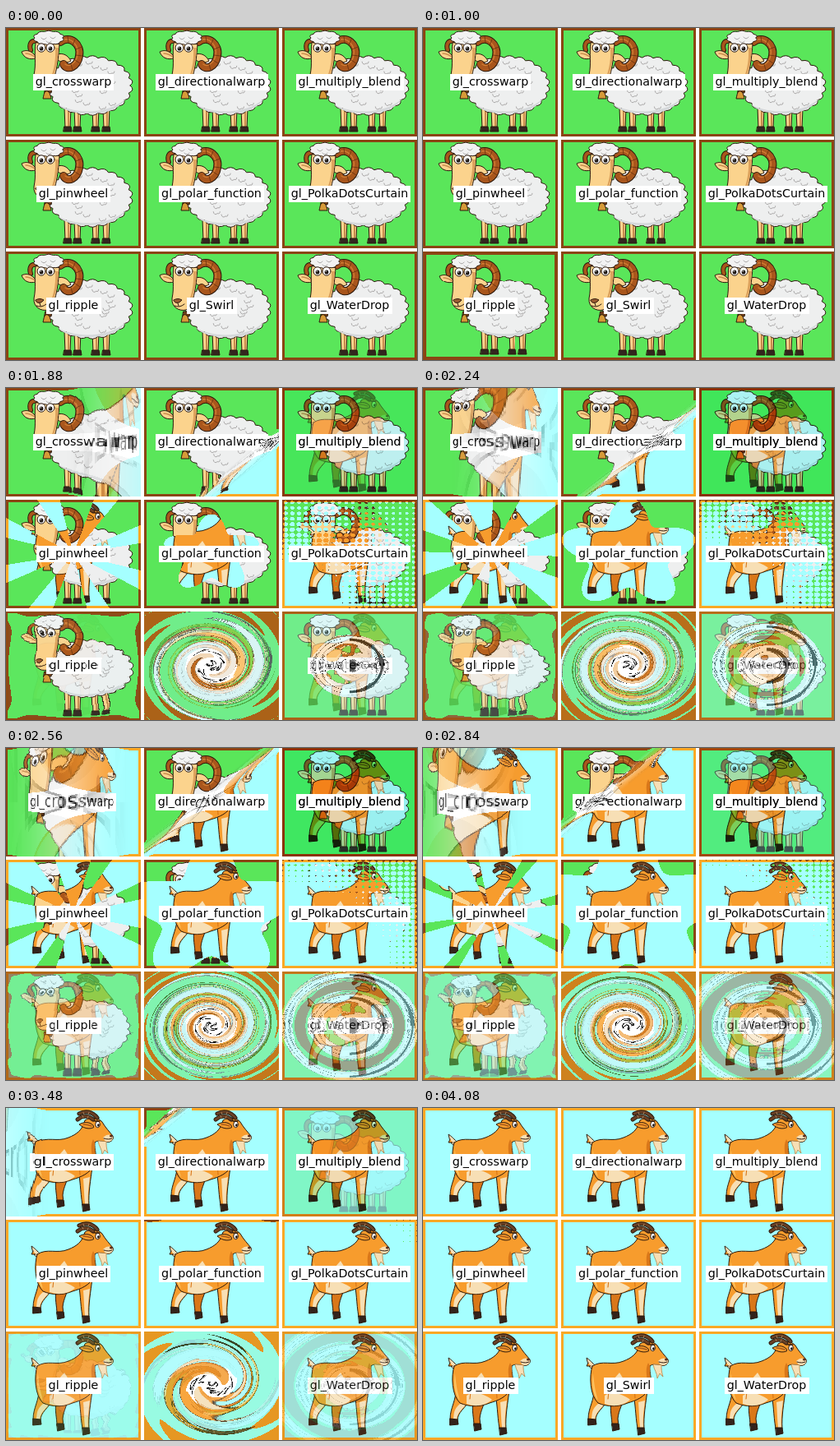
An HTML page with a canvas for the animation above (5 s loop, 500 by 404 pixels).

```html
<!DOCTYPE html>
<html>
<head>
<meta charset="utf-8">
<title>Transition gallery</title>
<style>
html, body { margin: 0; width: 100%; height: 100%; overflow: hidden; background: #fff; }
canvas { display: block; }
</style>
</head>
<body>
<canvas id="stage" width="500" height="404"></canvas>
<script>
const W = 164, H = 132, GAP = 4;
const START = 1000, SPAN = 3000, LOOP = 5000, STEP = 40;
const { PI, sin, cos, floor, atan2, hypot } = Math;

const clamp = (v, lo, hi) => v < lo ? lo : v > hi ? hi : v;
const smooth = (a, b, v) => { const t = clamp((v - a) / (b - a), 0, 1); return t * t * (3 - 2 * t); };
const scale = (v, k) => (v - 0.5) * k + 0.5;

// Each effect maps a point (y up, 0..1) and progress to a mix amount m
// and the sampling points in the first (fx, fy) and second (tx, ty) picture.
const effects = {
  gl_crosswarp(x, y, p) {
    const m = smooth(0, 1, p * 2 + x - 1);
    return { m, fx: scale(x, 1 - m), fy: scale(y, 1 - m), tx: scale(x, m), ty: scale(y, m) };
  },
  gl_directionalwarp(x, y, p) {
    const soft = 0.1;
    const m = 1 - smooth(-soft, 0, (y - x) / 2 + 0.5 - p * (1 + soft));
    return { m, fx: scale(x, 1 - m), fy: scale(y, 1 - m), tx: scale(x, m), ty: scale(y, m) };
  },
  gl_multiply_blend(x, y, p) {
    return { m: p, multiply: true };
  },
  gl_pinwheel(x, y, p) {
    const slice = PI / 4, a = atan2(y - 0.5, x - 0.5) + p * 2;
    return { m: a - slice * floor(a / slice) < p ? 1 : 0 };
  },
  gl_polar_function(x, y, p) {
    const a = atan2(y - 0.5, x - 0.5) - PI / 2;
    const radius = (cos(5 * a) + 4) / 4;
    return { m: hypot(x - 0.5, y - 0.5) > radius * p ? 0 : 1 };
  },
  gl_PolkaDotsCurtain(x, y, p) {
    const d = hypot(x * 20 % 1 - 0.5, y * 20 % 1 - 0.5);
    return { m: d < p / hypot(x, y) ? 1 : 0 };
  },
  gl_ripple(x, y, p) {
    const dx = x - 0.5, dy = y - 0.5;
    const k = (sin(p * hypot(dx, dy) * 100 - p * 50) + 0.5) / 30;
    return { m: smooth(0.2, 1, p), fx: x + dx * k, fy: y + dy * k };
  },
  gl_Swirl(x, y, p) {
    const dx = x - 0.5, dy = y - 0.5, near = 1 - hypot(dx, dy);
    const a = near * near * (1 - Math.abs(2 * p - 1)) * 8 * PI;
    const s = sin(a), c = cos(a);
    const fx = dx * c - dy * s + 0.5, fy = dx * s + dy * c + 0.5;
    return { m: p, fx, fy, tx: fx, ty: fy };
  },
  gl_WaterDrop(x, y, p) {
    const dx = x - 0.5, dy = y - 0.5, d = hypot(dx, dy);
    const k = d > p ? 0 : sin(d * 30 - p * 30);
    return { m: p, fx: x + dx * k, fy: y + dy * k };
  }
};

// ---- pictures ----

const INK = '#2b180c';

function shape(g, d, fill, line = INK, width = 1) {
  const path = new Path2D(d);
  if (fill) { g.fillStyle = fill; g.fill(path); }
  if (line) { g.strokeStyle = line; g.lineWidth = width; g.stroke(path); }
}

function oval(g, x, y, rx, ry, fill, line = INK, width = 1) {
  g.beginPath();
  g.ellipse(x, y, rx, ry, 0, 0, 2 * PI);
  if (fill) { g.fillStyle = fill; g.fill(); }
  if (line) { g.strokeStyle = line; g.lineWidth = width; g.stroke(); }
}

function tube(g, d, fill, width) {
  shape(g, d, null, INK, width + 2);
  shape(g, d, null, fill, width);
}

function cloud(g, x, y, rx, ry, n, puff, fill) {
  const at = (i, k) => [x + cos(i * 2 * PI / n) * rx * k, y + sin(i * 2 * PI / n) * ry * k];
  g.beginPath();
  g.moveTo(...at(0, 1));
  for (let i = 0; i < n; i++) g.quadraticCurveTo(...at(i + 0.5, puff), ...at(i + 1, 1));
  g.fillStyle = fill;
  g.fill();
  g.strokeStyle = INK;
  g.lineWidth = 1;
  g.stroke();
}

function backdrop(g, fill, edge) {
  g.fillStyle = edge;
  g.fillRect(0, 0, W, H);
  g.fillStyle = fill;
  g.fillRect(3, 3, W - 6, H - 6);
  g.lineJoin = g.lineCap = 'round';
}

function sheep(g) {
  const skin = '#fbd38d', horn = '#a9561c';
  backdrop(g, '#5ae65a', '#8b4513');
  for (const [x, y] of [[83, 97], [118, 98], [71, 97], [105, 98]]) {
    shape(g, `M${x} ${y}L${x + 1} 122L${x + 7} 122L${x + 8} ${y}Z`, skin);
    shape(g, `M${x + 5} ${y}L${x + 5} 119`, null, '#c98d4e', 2);
    shape(g, `M${x} 120L${x + 8} 120L${x + 9} 126L${x - 1} 126Z`, '#33261f');
  }
  cloud(g, 102, 70, 49, 34, 23, 1.15, '#eeefef');
  shape(g, 'M62 92C80 104 122 107 146 86C134 103 116 104 98 104C82 104 69 100 62 92Z', '#d5d8da', null);
  // curls of wool
  for (let i = 0; i < 19; i++) {
    const a = i * 2.4, r = 0.35 + i % 4 * 0.16;
    const x = 106 + cos(a) * 46 * r, y = 70 + sin(a) * 34 * r;
    shape(g, `M${x - 4} ${y - 1}q1 5 5 2q3 1 3 -2`, null, '#8b8988', 0.7);
  }
  shape(g, 'M48 73L56 73L55 79L47 79Z', '#70401c');
  shape(g, 'M48 77C53 75 54 82 55 86L45 86C46 82 46 79 48 77Z', '#d69a37');
  tube(g, 'M37 16C30 15 28 20 30 27', horn, 4);
  shape(g, 'M35 33C29 26 23 27 19 29C22 37 29 39 36 37Z', skin);
  shape(g, 'M24 31C28 31 32 33 35 35', null, '#c98d4e', 1.5);
  shape(g, 'M62 32C70 30 75 33 79 40C73 44 66 42 62 38Z', skin);
  tube(g, 'M66 17C78 8 92 20 89 34C87 47 75 53 70 44', horn, 8);
  shape(g, 'M68 15C80 10 89 22 87 33C85 43 77 48 72 44', null, '#cf7c33', 1.5);
  for (const d of ['M75 10L76 18', 'M84 14L81 21', 'M92 23L85 26', 'M93 34L85 33', 'M90 43L84 39', 'M81 51L79 44'])
    shape(g, d, null, '#64300f', 0.8);
  shape(g, 'M36 18C34 32 37 43 34 57C33 68 43 73 51 71C60 66 63 46 65 20Z', skin);
  shape(g, 'M60 24C61 42 57 57 51 68C59 63 63 42 64 24Z', '#dca15c', null);
  cloud(g, 52, 12, 17, 8, 10, 1.28, '#f2f2f2');
  for (const [x, y] of [[47, 12], [58, 11], [53, 16]])
    shape(g, `M${x - 4} ${y}q3 4 6 0`, null, '#8b8988', 0.7);
  for (const x of [43, 54]) {
    oval(g, x, 24, 5, 5.2, '#fff');
    oval(g, x, 25, 2.4, 2.6, '#1e1713', null);
    oval(g, x - 0.8, 24, 0.7, 0.7, '#fff', null);
  }
  shape(g, 'M36 59Q41 56 46 59Q42 64 38 62Z', '#9b5b32');
  shape(g, 'M41 63L42 66M37 66Q43 69 49 64', null);
}

function goat(g) {
  const coat = '#f79c2d', shade = '#d97719', cream = '#f7dfb5', horn = '#694126';
  backdrop(g, '#a5ffff', '#f9a825');
  shape(g, 'M38 46C33 43 32 37 31 32C34 34 36 36 41 41Z', cream);
  shape(g, 'M36 42L31 42L33 38', coat);
  // far legs
  shape(g, 'M77 76C75 90 70 95 69 106L70 115L62 115C62 105 59 96 61 86Z', shade);
  shape(g, 'M62 112L70 112L71 119L63 121Z', '#33231b');
  shape(g, 'M40 68C41 84 33 92 33 107L42 108C42 98 51 94 58 82Z', coat);
  shape(g, 'M45 88C37 95 38 99 37 106L41 107C42 98 48 95 52 89Z', cream, null);
  shape(g, 'M33 106L42 107L43 113L33 114Z', '#33231b');
  shape(g, 'M87 73C91 88 90 100 93 118L101 118C100 103 103 88 105 71Z', coat);
  shape(g, 'M94 86C95 98 95 108 96 117L100 117C99 104 101 94 102 84Z', cream, null);
  shape(g, 'M93 117L101 117L102 124L94 126Z', '#33231b');
  shape(g, 'M38 42C50 34 62 42 76 36C86 32 93 27 96 15C102 11 112 11 117 17' +
    'C121 24 126 29 130 34C132 39 126 43 121 41C115 41 111 39 108 42' +
    'C107 51 112 58 107 69C102 80 91 84 81 87C69 92 57 92 45 87C35 78 34 54 38 42Z', coat);
  shape(g, 'M53 78C62 72 75 76 84 83C74 92 61 91 53 88Z', cream, null);
  shape(g, 'M64 58L71 50L76 58Z', cream, null);
  shape(g, 'M39 51C37 61 38 77 45 84C41 71 40 61 39 51Z', '#ffc25f', null);
  shape(g, 'M106 38C101 48 106 58 105 68C110 60 108 51 108 42Z', shade, null);
  shape(g, 'M85 65C89 71 90 76 90 81M53 63C59 70 58 77 57 82', null, shade, 1.2);
  // head
  tube(g, 'M111 12C105 4 96 3 89 7', horn, 3);
  tube(g, 'M106 14C99 8 93 9 87 14', horn, 3);
  for (const d of ['M94 5L95 8', 'M101 5L100 8', 'M93 9L94 12', 'M100 10L99 13'])
    shape(g, d, null, '#b28a61', 0.8);
  shape(g, 'M106 21C101 16 94 17 89 20C95 25 101 26 106 24Z', coat);
  shape(g, 'M94 20Q99 20 104 22', null, '#a95b1b', 1.5);
  oval(g, 111.5, 20, 2.7, 3.7, '#fff');
  oval(g, 112.3, 21, 1.3, 1.8, '#1e1713', null);
  shape(g, 'M108 16L114 16', null, INK, 1.3);
  shape(g, 'M118 36C123 31 128 32 130 35C131 39 126 42 121 41Z', cream, null);
  oval(g, 128, 34, 2, 1.5, '#5a2e1b', null);
  shape(g, 'M119 37Q125 39 129 37', null);
  shape(g, 'M112 40C113 47 117 50 117 57L120 51L124 55C122 49 122 45 122 41Z', cream, '#b78447', 0.8);
}

function label(g, text) {
  g.font = '14.25px "DejaVu Sans", sans-serif';
  g.textAlign = 'center';
  const w = Math.round(g.measureText(text).width) + 6;
  g.fillStyle = '#fff';
  g.fillRect(Math.round((W - w) / 2), 56, w, 20);
  g.fillStyle = '#000';
  g.fillText(text, W / 2, 70);
}

function picture(paint, text) {
  const c = document.createElement('canvas');
  c.width = W;
  c.height = H;
  const g = c.getContext('2d', { willReadFrequently: true });
  paint(g);
  label(g, text);
  return g.getImageData(0, 0, W, H).data;
}

// ---- playback ----

const ctx = document.getElementById('stage').getContext('2d');
const out = ctx.createImageData(W, H);
const tiles = Object.entries(effects).map(([name, effect], i) => ({
  effect,
  from: picture(sheep, name),
  to: picture(goat, name),
  left: i % 3 * (W + GAP),
  top: floor(i / 3) * (H + GAP)
}));

const offset = (x, y) =>
  4 * (clamp(floor((1 - y) * H), 0, H - 1) * W + clamp(floor(x * W), 0, W - 1));

function render({ effect, from, to, left, top }, p, still) {
  const px = out.data;
  if (still) px.set(p < 0.5 ? from : to);
  else for (let j = 0, o = 0; j < H; j++) {
    const y = 1 - (j + 0.5) / H;
    for (let i = 0; i < W; i++, o += 4) {
      const x = (i + 0.5) / W;
      const { m, fx = x, fy = y, tx = x, ty = y, multiply } = effect(x, y, p);
      const a = offset(fx, fy), b = offset(tx, ty);
      for (let k = 0; k < 3; k++) {
        const u = from[a + k], v = to[b + k], both = u * v / 255;
        px[o + k] = !multiply ? u + (v - u) * m
          : m < 0.5 ? u + (both - u) * 2 * m
          : both + (v - both) * (2 * m - 1);
      }
      px[o + 3] = 255;
    }
  }
  ctx.putImageData(out, left, top);
}

let shown = -1;
function tick() {
  const t = floor(performance.now() % LOOP / STEP) * STEP;
  const now = clamp(t, START - STEP, START + SPAN);
  if (now !== shown) {
    shown = now;
    const p = clamp((now - START) / SPAN, 0, 1);
    for (const tile of tiles) render(tile, p, now < START || p === 1);
  }
  requestAnimationFrame(tick);
}

ctx.fillStyle = '#fff';
ctx.fillRect(0, 0, 500, 404);
tick();
</script>
</body>
</html>
```
